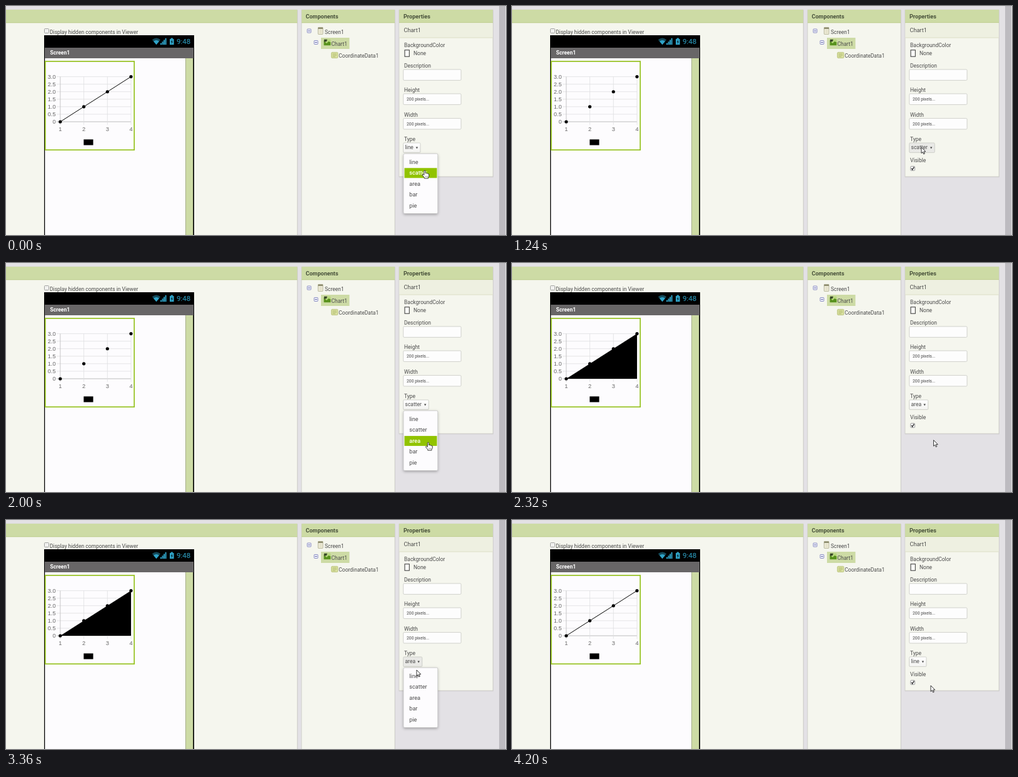
An HTML page for the animation above (4640 ms loop, 800 px wide and 368 px high).

```html
<!DOCTYPE html>
<html lang="en">
<head>
<meta charset="utf-8">
<title>Chart type picker</title>
<style>
  html, body { margin: 0; width: 100%; height: 100%; overflow: hidden; background: #e3e1e5; }
  svg { display: block; width: 800px; height: 368px; }
  text { font: 8.5px Roboto, sans-serif; fill: #4b4b4b; white-space: pre; }
  .head { font-weight: 700; font-size: 9.1px; fill: #47503a; }
  .mid { font-size: 9.1px; }
  .small { font-size: 6.8px; fill: #444; }
  .axis { font: 9.2px "Liberation Sans", Arial, sans-serif; fill: #666; }
  .panel { fill: #f5f6ee; stroke: #d3d5c9; stroke-width: .7; }
  .field { fill: #fdfdfd; stroke: #c6c7c1; stroke-width: .8; }
</style>
</head>
<body>
<svg viewBox="0 0 800 368" xmlns="http://www.w3.org/2000/svg">
  <defs>
    <filter id="shadow" x="-20%" y="-20%" width="140%" height="150%">
      <feDropShadow dx="0" dy="1.5" stdDeviation="2" flood-color="#000" flood-opacity=".3"/>
    </filter>
    <linearGradient id="face" x2="0" y2="1">
      <stop stop-color="#fff"/><stop offset="1" stop-color="#f3f3f1"/>
    </linearGradient>
  </defs>

  <rect width="800" height="368" fill="#e3e1e5"/>
  <rect x="789" width="10" height="368" fill="#bdbbc0"/>
  <rect x="799" width="1" height="368" fill="#e9e8ea"/>

  <g id="panels"></g>

  <!-- phone -->
  <rect x="61.5" y="36.5" width="7" height="7" rx="1" fill="#f1f1ef" stroke="#8d8d8d" stroke-width=".8"/>
  <text x="70" y="44.7">Display hidden components in Viewer</text>
  <rect x="61" y="47" width="240" height="330" fill="#000"/>
  <rect x="62" y="67" width="238" height="17" fill="#686667"/>
  <rect x="62.3" y="84" width="225" height="290" fill="#fdfcfe"/>
  <rect x="287.3" y="84" width="12" height="290" fill="#cddba5"/>
  <text x="70.5" y="78" style="font-weight:700;fill:#fff">Screen1</text>
  <g fill="#2fa3c7">
    <path d="M233.8 54.2Q240.5 49 247.2 54.2L240.5 62.3Z" opacity=".45"/>
    <path d="M236 56.8Q240.5 53.4 245 56.8L240.5 62.3Z"/>
    <path d="M247 62.2v-2.5h2v2.5zM249.6 62.2v-5h2v5zM252.1 62.2v-7.6h2v7.6zM254.6 62.2v-10.4h2v10.4z"/>
    <path d="M262 53h1.7v-1.6h3.2V53h1.7v9.3H262z"/>
    <path d="M266.2 54.3l-2.6 3.8h1.5l-.6 3 2.6-3.9h-1.5z" fill="#06242d"/>
    <text x="273" y="61" style="font-size:11.5px;fill:#2fa3c7">9:48</text>
  </g>

  <!-- chart -->
  <rect x="62.8" y="89" width="142.4" height="142.3" fill="#fdfcfe" stroke="#94c11c" stroke-width="1.7"/>
  <g id="grid"></g>
  <path id="area" d="M86.8 186L200 113.6V186Z"/>
  <path id="line" d="M86.8 186L200 113.6" stroke="#000" fill="none"/>
  <g id="dots"></g>
  <rect x="124.3" y="214.4" width="15.2" height="9.2"/>

  <!-- component tree -->
  <g id="folds" fill="#eef0fb" stroke="#8284bd" stroke-width=".9"></g>
  <rect x="504" y="51" width="45.5" height="18" fill="#cddba5"/>
  <rect x="499.4" y="34.4" width="7.6" height="11" rx=".6" fill="#f3f1df" stroke="#a7a585" stroke-width=".8"/>
  <path d="M499.4 34.4h7.6v2.6h-7.6z" fill="#8f8e70"/>
  <path d="M501 39h4.5M501 41h4.5M501 43h4.5" stroke="#c9c7a8" stroke-width=".7"/>
  <rect x="508.6" y="53.5" width="10.8" height="9.8" rx="1" fill="#b7d77d"/>
  <path d="M508.6 55v8.3h10.8v-5l-3.4-1.4-3 3-2-1.7z" fill="#58921d"/>
  <path d="M509 53.7h5l-1 3.2-4 1z" fill="#39482a"/>
  <rect x="520.6" y="74.4" width="10.4" height="9.2" rx="1.5" fill="#d9dfa0" stroke="#b1bd70" stroke-width=".8"/>
  <path d="M522.5 77h6.5M522.5 79.2h6.5M522.5 81.4h4.5" stroke="#a9b565" stroke-width=".8"/>
  <text x="510" y="45">Screen1</text>
  <text x="520.5" y="63.5">Chart1</text>
  <text x="532.3" y="82.6">CoordinateData1</text>

  <!-- properties -->
  <g id="labels"></g>
  <rect x="638" y="70.8" width="7.3" height="10.4" fill="#fbfbf8" stroke="#333" stroke-width="1"/>
  <text x="652" y="79">None</text>
  <g id="fields"></g>
  <rect x="637.7" y="257.7" width="6.8" height="6.8" rx="1" fill="#f7f7f7" stroke="#888" stroke-width=".8"/>
  <path d="M639 261l1.7 2 2.6-4.3" fill="none" stroke="#333" stroke-width="1.4"/>

  <rect id="button" x="635.6" y="220" height="15.6" rx="1.5" stroke="#c6c7c1" stroke-width=".8"/>
  <text id="value" x="638.5" y="230.4"></text>
  <path id="caret" d="M-1.7 -1.2h3.4L0 1.8Z" fill="#444"/>

  <g id="menu">
    <rect x="636" y="237.3" width="54.8" height="96.2" rx="2" fill="#fdfcfe" stroke="#bdbdbd" stroke-width=".7" filter="url(#shadow)"/>
    <g id="items"></g>
  </g>

  <g id="cursor" stroke-linejoin="round">
    <path id="arrow" d="M0 0V9.6L2.2 7.6L3.7 11L5.3 10.3L3.8 7H6.8Z" fill="#fff" stroke="#222" stroke-width=".9"/>
    <g id="hand">
      <path d="M-1.1 7.6V1.4Q-1.1 .3 0 .3T1.1 1.4V4.6Q2.8 3.9 3.3 5Q4.9 4.5 5.3 5.7Q6.8 5.5 6.8 7V9.1Q6.5 10.8 5.5 11.5V13H-.7V11.7L-3.7 8Q-4.3 6.7-3.1 6.4Q-2 6.3-1.1 7.6Z" fill="#fff" stroke="#222" stroke-width=".9"/>
      <path d="M1.2 9.2v2M3 9.2v2M4.7 9.2v2" stroke="#555" stroke-width=".6"/>
    </g>
  </g>
</svg>
<script>
const LOOP = 4640, STEP = 40;
const $ = id => document.getElementById(id);

function add(parent, tag, attrs, label) {
  const el = document.createElementNS("http://www.w3.org/2000/svg", tag);
  for (const k in attrs) el.setAttribute(k, attrs[k]);
  if (label !== undefined) el.textContent = label;
  return $(parent).appendChild(el);
}

// Panels: x, width, height, title, title x
for (const [x, w, h, title, tx] of [
  [-5, 471, 380, "", 0], [473, 149, 380, "Components", 479.5], [629, 150, 268, "Properties", 636]
]) {
  add("panels", "rect", { x: x - .5, y: 6.5, width: w + 1.5, height: h + .8, fill: "#cfcdd1" });
  add("panels", "rect", { x, y: 6, width: w, height: h, class: "panel" });
  add("panels", "rect", { x, y: 6, width: w, height: 21, fill: "#cddba5" });
  add("panels", "rect", { x, y: 26.4, width: w, height: .9, fill: "#b9cb88" });
  add("panels", "text", { x: tx, y: 19.7, class: "head" }, title);
}
add("panels", "rect", { x: 629.3, y: 27.4, width: 149.4, height: 23.6, fill: "#eef0e1" });
add("panels", "rect", { x: 629.3, y: 50.6, width: 149.4, height: .8, fill: "#d6dabf" });
add("panels", "text", { x: 636.5, y: 41.7, class: "mid" }, "Chart1");

for (const [x, y] of [[482, 37], [493, 55.5]]) {
  add("folds", "rect", { x, y, width: 6, height: 6, rx: .8 });
  add("folds", "path", { d: `M${x + 1.4} ${y + 3}h3.2`, stroke: "#4a4c93" });
}

for (const [name, y] of [["BackgroundColor", 66], ["Description", 99], ["Height", 138],
                         ["Width", 177.7], ["Type", 217], ["Visible", 251]])
  add("labels", "text", { x: 637, y }, name);

[102, 141, 180.6].forEach((y, i) => {
  add("fields", "rect", { x: 635.7, y, width: 92.4, height: 17.4, rx: 1.5, class: "field" });
  if (i) add("fields", "text", { x: 641, y: y + 11, class: "small" }, "200 pixels...");
});

// Chart axes and points
const px = i => 86.8 + i * 37.73, py = v => 186 - v * 24.13;
for (let v = 0; v <= 3; v += .5) {
  add("grid", "path", { d: `M81 ${py(v)}H200`, stroke: v ? "#dfdfe1" : "#aaa", "stroke-width": .8 });
  add("grid", "text", { x: 79.5, y: py(v) + 3.2, class: "axis", "text-anchor": "end" }, v ? v.toFixed(1) : "0");
}
for (let i = 0; i < 4; i++) {
  add("grid", "path", { d: `M${px(i)} 113.6V191`, stroke: i ? "#dfdfe1" : "#bbb", "stroke-width": .8 });
  add("grid", "text", { x: px(i), y: 201.4, class: "axis", "text-anchor": "middle" }, i + 1);
  add("dots", "circle", { cx: px(i), cy: py(i), r: 2.6 });
}

const items = ["line", "scatter", "area", "bar", "pie"].map((name, i) => {
  const y = 242.8 + i * 17.55;
  return {
    bar: add("items", "rect", { x: 637.5, y, width: 52, height: 16, fill: "#91c300" }),
    label: add("items", "text", { x: 645.3, y: y + 11, class: "mid" }, name)
  };
});

// Pointer: time, x, y
const path = [
  [0, 670, 264], [240, 670, 264], [280, 670, 261], [680, 670, 261], [1240, 655, 227], [1320, 655, 229],
  [1400, 662, 246], [1480, 670, 264], [1640, 674, 277], [1800, 676, 287], [1840, 675.5, 288],
  [2000, 675.5, 288], [2040, 675, 287], [2240, 675, 287], [2800, 667, 244], [3040, 653, 228],
  [3240, 653, 228], [3360, 657, 241], [3480, 657, 246], [4000, 657, 246], [4200, 670, 266], [LOOP, 670, 266]
];
const handSpans = [[0, 280], [1400, 2040], [3400, 3760]];
const menuSpans = [[0, 280], [1280, 2040], [3240, 3760]];
const pressSpans = [[1080, 1360], [2960, 3440]];
const types = [[0, "line", 663], [280, "scatter", 676.3], [2040, "area", 665.8], [3760, "line", 663]];
// Highlights: item, on, off
const hovers = [[1, -200, 280], [0, 1360, 1440], [1, 1480, 1680], [2, 1640, 2040], [0, 3360, 3760]];

const within = (spans, t) => spans.some(([a, b]) => t >= a && t < b);
const clamp = v => Math.max(0, Math.min(1, v));
const show = (id, on) => $(id).setAttribute("visibility", on ? "visible" : "hidden");

function pointer(t) {
  const i = path.findIndex(p => p[0] > t), [t0, x0, y0] = path[i - 1], [t1, x1, y1] = path[i];
  const u = (t - t0) / (t1 - t0), e = u * u * (3 - 2 * u);
  return [x0 + (x1 - x0) * e, y0 + (y1 - y0) * e];
}

function draw(now) {
  const t = Math.floor((now % LOOP) / STEP) * STEP;
  const [, type, right] = types.filter(s => s[0] <= t).pop();
  show("line", type === "line");
  show("area", type === "area");

  $("value").textContent = type;
  $("button").setAttribute("width", right - 635.6);
  $("button").setAttribute("fill", within(pressSpans, t) ? "#e9e9e6" : "url(#face)");
  $("caret").setAttribute("transform", `translate(${right - 5.6} 227.6)`);

  $("menu").style.display = within(menuSpans, t) ? "" : "none";
  items.forEach(({ bar, label }, i) => {
    let glow = 0;
    for (const [row, on, off] of hovers)
      if (row === i) glow = Math.max(glow, Math.min(clamp((t - on) / 80), clamp(1 - (t - off) / 90)));
    bar.setAttribute("opacity", glow);
    label.style.fill = glow > .3 ? "#fff" : "";
    label.style.fontWeight = glow > .9 ? 500 : "";
  });

  const hand = within(handSpans, t);
  show("hand", hand);
  show("arrow", !hand);
  $("cursor").setAttribute("transform", `translate(${pointer(t)})`);
}

const start = performance.now();
function tick() {
  draw(performance.now() - start);
  requestAnimationFrame(tick);
}
tick();
</script>
</body>
</html>
```
